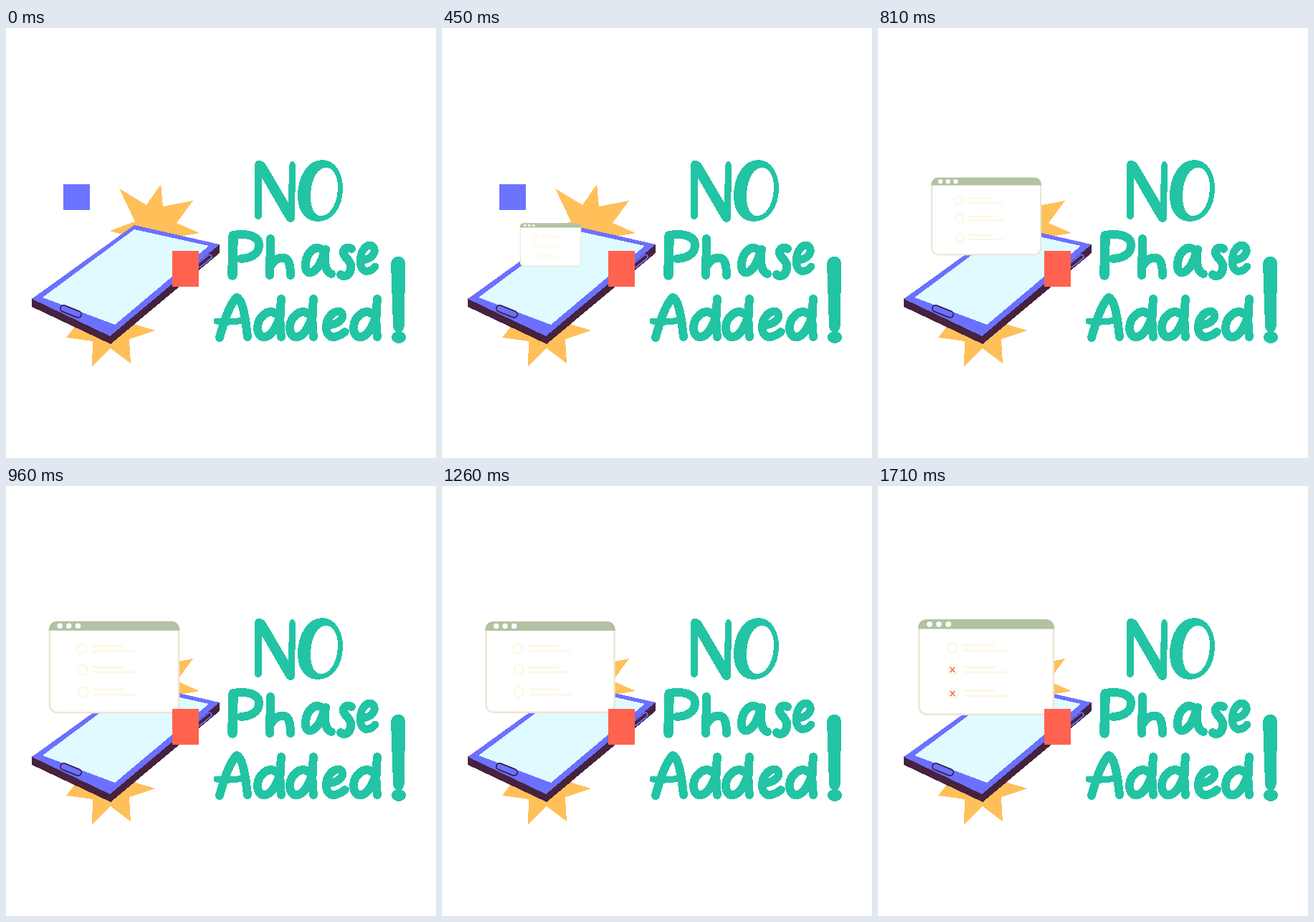
Animation of 600 by 600 pixels, one loop 2700 ms. Source, as an HTML page:

```html
<!DOCTYPE html>
<html lang="en">
<head>
<meta charset="utf-8">
<title>No phase added</title>
<style>
  html, body { margin: 0; width: 100%; height: 100%; overflow: hidden; background: #fff; }
  svg { display: block; width: 100%; height: 100%; }
  .crisp { shape-rendering: crispEdges; }
  .lettering { fill: none; stroke: #22c4a4; stroke-width: 12; stroke-linecap: round; stroke-linejoin: round; }
  .lettering .solid { fill: #22c4a4; stroke: none; }
</style>
</head>
<body>
<svg viewBox="0 0 600 600">
  <g class="crisp" fill="#ffc05a">
    <path d="M145 283L180 270L158 224L196 247L216 218L219 249L261 241L238 272L270 286L225 294L175 292Z"/>
    <path d="M84 432L105 405L185 400L181 414L208 422L172 434L174 468L146 447L120 472L121 437Z"/>
  </g>

  <rect x="80" y="218" width="37" height="36" fill="#6c74ff"/>

  <g id="phone">
    <g class="crisp">
      <path d="M36 377L145 429L298 302V314L146 441L36 389Z" fill="#46223f"/>
      <path d="M179 275L298 302L145 430L36 378Z" fill="#6c70ff"/>
      <path d="M179 281L283 304L152 414L51 376Z" fill="#e0fbff"/>
    </g>
    <g fill="none" stroke="#3c2050" stroke-width="1.8">
      <rect x="75" y="391" width="31" height="9" rx="4.5" transform="rotate(22 90.5 395.5)"/>
      <rect x="265" y="322" width="24" height="6" rx="3" transform="rotate(-39 277 325)" stroke="#6c70ff"/>
    </g>
  </g>

  <g id="window">
    <rect x="57.2" y="187.2" width="187.6" height="131.6" rx="11" fill="#fff" stroke="#ece5d3" stroke-width="2.5"/>
    <path d="M56 199.5V198Q57 186 69 186H233Q245 186 246 198V199.5Z" fill="#b2c2a2"/>
    <g fill="#fff">
      <circle cx="72" cy="192.8" r="3.9"/>
      <circle cx="85" cy="192.8" r="3.9"/>
      <circle cx="98.3" cy="192.8" r="3.9"/>
    </g>
    <g fill="none" stroke="#fdf8e3" stroke-width="2.8">
      <circle cx="103.5" cy="226" r="7"/>
      <circle cx="105" cy="256.5" r="7"/>
      <circle cx="105.5" cy="289" r="7"/>
      <path stroke-width="3.2" stroke-linecap="round" d="M120 222H162M121 229.7H179M120 253H163M121 260H180M121 285.3H163M122 293H180"/>
    </g>
    <g fill="none" stroke="#f47c70" stroke-width="2">
      <path id="cross2" d="M100.6 252.8L107.2 260.2M107.2 252.8L100.6 260.2"/>
      <path id="cross3" d="M100.8 285.8L107.4 293.2M107.4 285.8L100.8 293.2"/>
    </g>
  </g>

  <rect x="232" y="311" width="37" height="50" fill="#ff624e"/>

  <g class="lettering crisp" role="img" aria-label="NO Phase Added!">
    <!-- NO -->
    <path class="solid" d="M347 191Q348 184 355 185Q360 186 364 193L394 244L395 193Q396 186 400 186Q404 187 404 194L403 265Q402 271 397 271Q393 271 389 264L357 209L357 262Q356 267 352 267Q347 267 347 261Z"/>
    <path class="solid" fill-rule="evenodd" d="M441 184C460 184 470 203 470 224C470 249 457 270 435 270C417 270 407 255 407 234C407 207 421 184 441 184ZM444 195C432 198 425 216 425 235C425 252 431 262 439 262C454 262 463 243 463 222C463 206 456 193 444 195Z"/>
    <!-- Phase -->
    <path d="M317 290L316 345" stroke-width="13.5"/>
    <path d="M317 289C337 286 353 290 353 303C353 315 342 321 328 322"/>
    <path d="M369 294L368 345M369 333C376 319 391 316 395 328Q397 335 397 345"/>
    <path d="M441 309C428 301 417 318 418 334C420 347 434 342 441 322L446 309C443 326 446 341 454 343"/>
    <path d="M482 308C475 304 468 310 472 317C477 324 483 328 481 337C479 346 471 348 467 344"/>
    <path d="M496 324C510 323 517 314 513 306C508 299 498 305 495 318C492 333 498 341 506 339Q511 338 515 333" stroke-width="11"/>
    <!-- Added! -->
    <path d="M298 432C304 410 312 385 322 376C331 379 335 411 337 431"/>
    <path d="M294 409C306 411 322 410 334 407" stroke-width="9"/>
    <path id="letter-d" d="M379 400C366 389 351 404 351 418C351 435 366 436 376 418L383 402M384 378C382 397 382 417 384 431"/>
    <use href="#letter-d" x="45"/>
    <path d="M448 415C463 414 472 406 469 399C465 391 453 397 448 409C444 423 450 433 459 431Q467 429 473 424" stroke-width="11.5"/>
    <use href="#letter-d" x="134"/>
    <path class="solid" d="M537 328Q539 319 547 319Q556 319 557 328L556 414Q555 425 548 425Q540 424 540 414Z"/>
    <ellipse class="solid" cx="548" cy="431.5" rx="10" ry="8.5"/>
  </g>
</svg>

<script>
const LOOP = 2700, STEP = 30;
const find = id => document.getElementById(id);
const panel = find('window');
const crosses = [[find('cross2'), 1500], [find('cross3'), 1710]];

const ramp = (t, start, end) => Math.min(1, Math.max(0, (t - start) / (end - start)));
const show = (node, visible) => node.setAttribute('visibility', visible ? 'visible' : 'hidden');

function draw(t) {
  // Grow, ease back slightly, then return to full size.
  const scale = ramp(t, 0, 1000) - 0.07 * ramp(t, 1000, 1400) + 0.07 * ramp(t, 1400, 1500);
  const x = 152 - ramp(t, 0, 900);
  const y = 352 - 99 * ramp(t, 0, 900);
  panel.setAttribute('transform', `translate(${x} ${y}) scale(${scale}) translate(-151 -253)`);
  panel.style.display = t > 0 ? '' : 'none';
  for (const [cross, time] of crosses) show(cross, t >= time);
}

const start = performance.now();
function tick() {
  const t = (performance.now() - start) % LOOP;
  draw(Math.floor(t / STEP) * STEP);
  requestAnimationFrame(tick);
}
tick();
</script>
</body>
</html>
```
